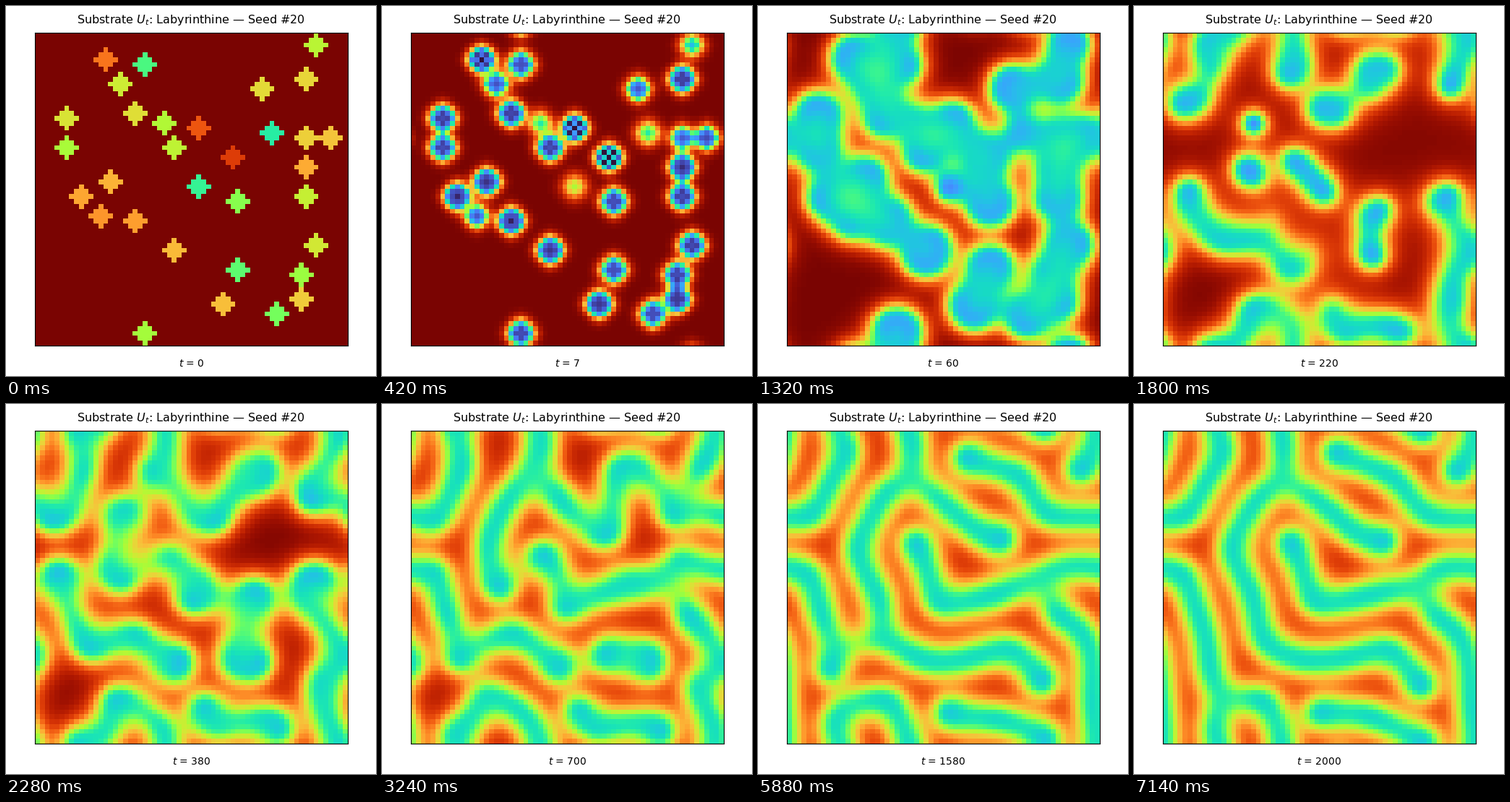
Recreate the animation shown at these times as a matplotlib script. Size 512 px wide and 512 px high, loop 8000 ms.

```python
import numpy as np
import matplotlib.pyplot as plt
from matplotlib.animation import FuncAnimation

SIZE, CELLS = 512, 64
DU, DV, FEED, KILL = 0.16, 0.08, 0.037, 0.060   # Gray-Scott labyrinth regime
TICK, HOLD, LOOP, LAST = 20, 60, 8000, 119
LEFT, TOP, SIDE = 40.2, 37.2, 432.4

# Seed discs (column, row), ordered by rising substrate level.
SPOTS = [
    (48, 20), (33, 31), (22, 6), (41, 48), (49, 57), (41, 34), (54, 49), (22, 61),
    (6, 23), (26, 18), (57, 2), (28, 23), (55, 33), (17, 10), (57, 43), (6, 17),
    (20, 16), (46, 11), (55, 9), (55, 21), (54, 54), (60, 21), (38, 55), (28, 44),
    (15, 30), (55, 27), (9, 33), (20, 38), (13, 37), (14, 5), (33, 19), (40, 25),
]
ACTIVE = 0.7
FAINT = {(33, 31): .29, (26, 18): .34, (57, 2): .38, (48, 20): .38, (13, 37): .42,
         (55, 21): .45, (46, 11): .48, (60, 21): .5, (17, 10): .52}


def laplacian(a):
    return sum(np.roll(a, s, axis) for s in (1, -1) for axis in (0, 1)) - 4 * a


def step_count(frame):
    """Single steps up to 20, then 20 steps per frame."""
    return frame if frame <= 20 else 20 * (frame - 19)


def seeded_fields():
    u, v = np.ones((CELLS, CELLS)), np.zeros((CELLS, CELLS))
    rows, cols = np.indices(u.shape)
    levels = np.interp(range(len(SPOTS)), [0, 6, 28, 31], [.36, .49, .72, .85])
    for (x, y), level in zip(SPOTS, levels):
        disc = (cols - x) ** 2 + (rows - y) ** 2 <= 4
        u[disc], v[disc] = level, FAINT.get((x, y), ACTIVE)
    return u, v


def simulate():
    u, v = seeded_fields()
    history = []
    for _ in range(step_count(LAST) + 1):
        history.append(u)
        reaction = u * v * v
        u, v = (u + DU * laplacian(u) - reaction + FEED * (1 - u),
                v + DV * laplacian(v) + reaction - (FEED + KILL) * v)
    return history


history = simulate()
fig = plt.figure(figsize=(SIZE / 100, SIZE / 100), dpi=100, facecolor="white")
ax = fig.add_axes([LEFT / SIZE, 1 - (TOP + SIDE) / SIZE, SIDE / SIZE, SIDE / SIZE])
ax.set(xticks=[], yticks=[])
image = ax.imshow(history[0], cmap="turbo", vmin=0, vmax=1,
                  interpolation="nearest", aspect="auto")


def caption(text, baseline, size):
    return fig.text((LEFT + SIDE / 2) / SIZE, 1 - baseline / SIZE, text,
                    ha="center", va="baseline", fontsize=size)


caption("Substrate $U_t$: Labyrinthine — Seed #20", 24, 11.5)
label = caption("", 499, 10)


def draw(i):
    t = step_count(min(i * TICK // HOLD, LAST))
    image.set_data(history[t])
    label.set_text(f"$t$ = {t}")
    return image, label


anim = FuncAnimation(fig, draw, frames=LOOP // TICK, interval=TICK, repeat=True)
plt.show()
```
